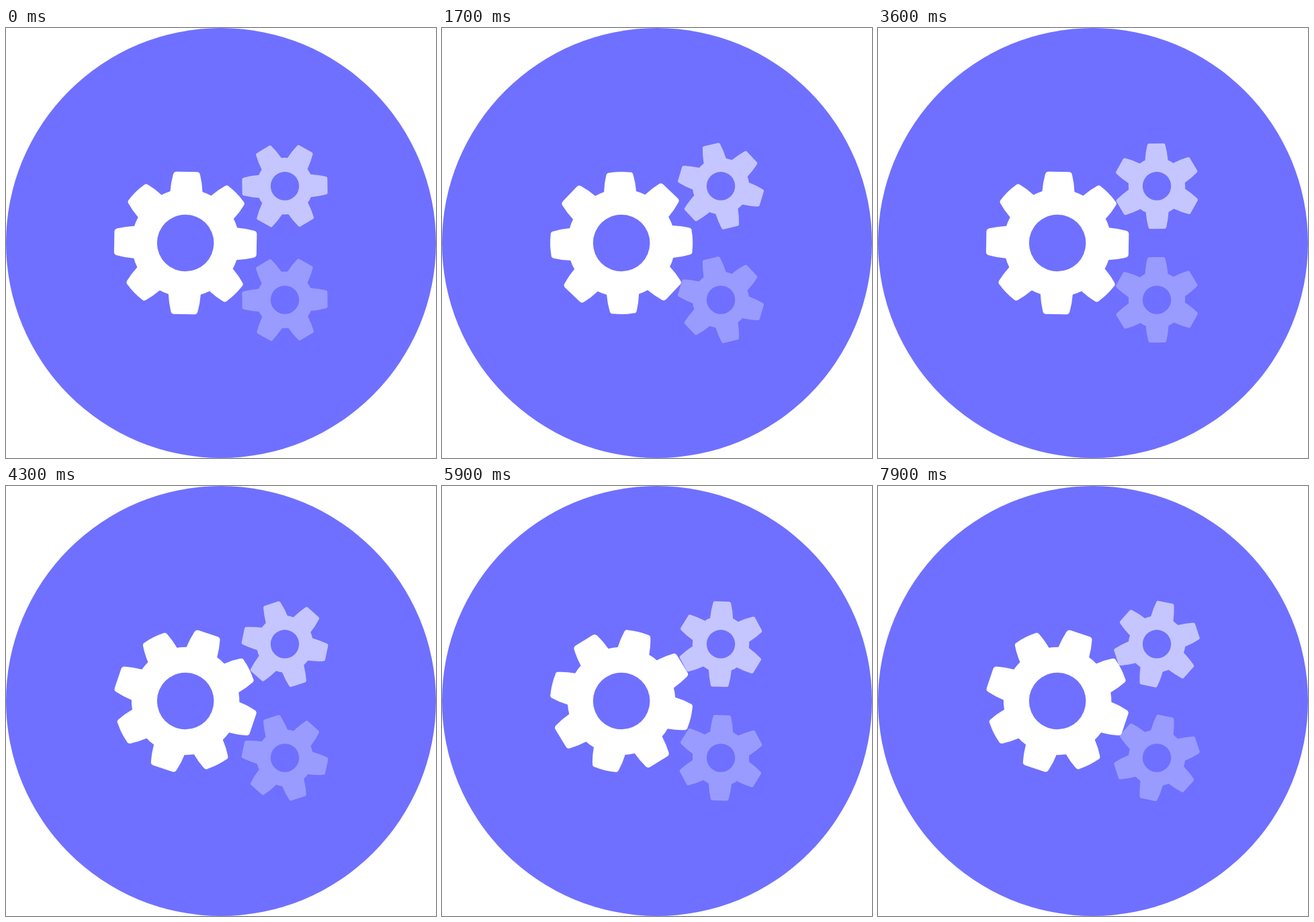
Write an HTML page that moves like this. It is 640 px wide and 640 px high and loops after 8000 ms.

```html
<!DOCTYPE html>
<html lang="en">
<head>
<meta charset="utf-8">
<title>Turning gears</title>
<style>
html, body { margin: 0; width: 100%; height: 100%; overflow: hidden; background: #fff; }
svg { display: block; width: 100%; height: 100%; }
</style>
</head>
<body>
<svg viewBox="0 0 640 640">
  <circle cx="320" cy="320" r="320" fill="#6f70ff"/>
</svg>
<script>
const svg = document.querySelector('svg');
const FLAT = 'M-24-60V-76.5Q-23.2-90-20-102Q-19-106-15-106H15Q19-106 20-102Q23.2-90 24-76.5V-60Z';
const ROUND = 'M-24-60V-76.5Q-23.2-90-20-101.5Q-19-105.3-15-105A106 106 0 0 1 15-105Q19-105.3 20-101.5Q23.2-90 24-76.5V-60Z';
const SMALL = 'M-17-30V-38.5Q-16-51-13.4-61Q-12.8-63.5-11-63.5H11Q12.8-63.5 13.4-61Q16-51 17-38.5V-30Z';

// Teeth cycle through the given shapes around the rim.
function gear(x, y, count, shapes, root, hole, opacity, start, speed) {
  let teeth = '';
  for (let i = 0; i < count; i++)
    teeth += `<path d="${shapes[i % shapes.length]}" transform="rotate(${i * 360 / count})"/>`;
  svg.insertAdjacentHTML('beforeend', `<g transform="translate(${x} ${y})">
    <g fill="#fff" opacity="${opacity}"><circle r="${root}"/>${teeth}</g>
    <circle r="${hole}" fill="#6f70ff"/></g>`);
  const wheel = svg.lastElementChild.firstElementChild;
  return t => wheel.setAttribute('transform', `rotate(${start + speed * t})`);
}

const gears = [
  gear(415, 235.3, 6, [SMALL], 42.2, 21.2, 0.6, 29.2, -25),
  gear(415, 404.6, 6, [SMALL], 42.2, 21.2, 0.3, 29.2, -25),
  gear(267.1, 320, 8, [FLAT, ROUND], 80.2, 42.3, 1, 1, 25)
];

// Ten poses per second, eight seconds per loop.
function draw() {
  const t = Math.floor(performance.now() / 100) % 80 / 10;
  gears.forEach(turn => turn(t));
  requestAnimationFrame(draw);
}
draw();
</script>
</body>
</html>
```
